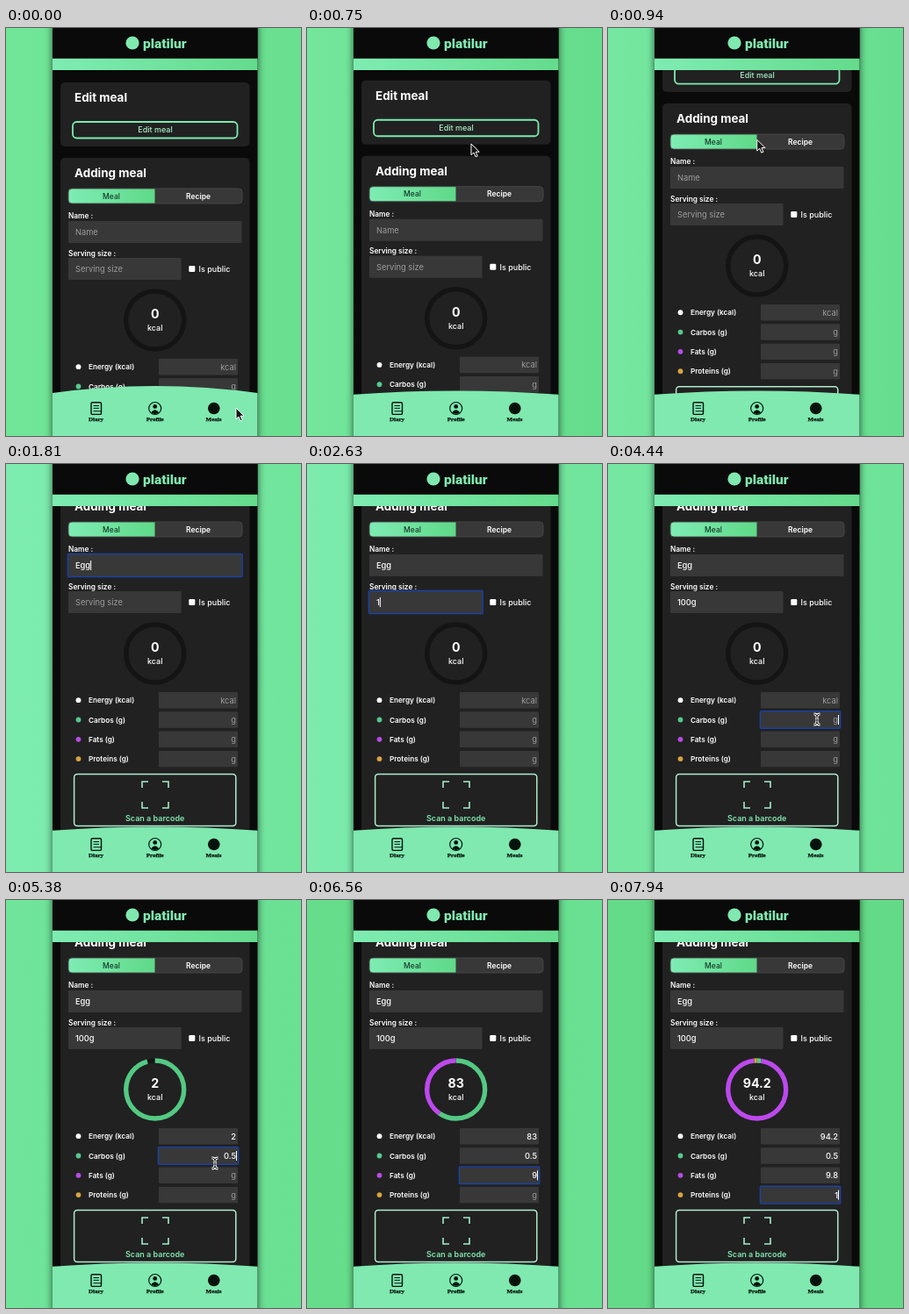
An HTML page that plays this animation: 336x465 px, repeating every 8 s.

```html
<!DOCTYPE html>
<html lang="en">
<head>
<meta charset="utf-8">
<title>Adding a meal</title>
<style>
  html, body { margin: 0; width: 100%; height: 100%; overflow: hidden; background: #6fe398; }
  svg { display: block; width: 100vw; height: 100vh; }
  text { font-family: Inter, "Open Sans", sans-serif; }
  .phone { filter: drop-shadow(0 0 4px rgba(0, 0, 0, .65)); }
  .nav text { font: bold 7px "Liberation Serif", serif; fill: #06130c; stroke: #06130c; stroke-width: .25; }
</style>
</head>
<body>
<svg id="stage" viewBox="0 0 336 465" preserveAspectRatio="none">
  <defs>
    <linearGradient id="backdrop"><stop/><stop offset="1"/></linearGradient>
    <linearGradient id="strip"><stop stop-color="#7eecb2"/><stop offset="1" stop-color="#64db8c"/></linearGradient>
    <linearGradient id="tab"><stop stop-color="#7eecb4"/><stop offset="1" stop-color="#5fd988"/></linearGradient>
  </defs>
</svg>
<script>
const LOOP = 8000;
const stage = document.getElementById('stage');
const MINT = '#7fe9b0', WHITE = '#fff', FIELD = '#383838', HINT = '#9b9b9b', INK = '#06130c';

function el(parent, name, attrs = {}) {
  const node = document.createElementNS('http://www.w3.org/2000/svg', name);
  set(node, attrs);
  parent.append(node);
  return node;
}
function set(node, attrs) {
  for (const key in attrs) node.setAttribute(key, attrs[key]);
}
const group = (parent, attrs) => el(parent, 'g', attrs);
const box = (parent, x, y, width, height, fill, more) =>
  el(parent, 'rect', { x, y, width, height, fill, ...more });
const path = (parent, d, more) => el(parent, 'path', { d, fill: 'none', ...more });
const dot = (parent, cx, cy, r, fill, more) => el(parent, 'circle', { cx, cy, r, fill, ...more });
const show = (node, visible) => set(node, { visibility: visible ? 'visible' : 'hidden' });
function label(parent, x, y, size, string, weight = 600, fill = WHITE, anchor = 'start') {
  const node = el(parent, 'text', {
    x, y, fill, 'font-size': size, 'font-weight': weight, 'text-anchor': anchor
  });
  node.textContent = string;
  return node;
}

// Piecewise tracks: rows of [time, value, ...]
const smooth = p => p * p * (3 - 2 * p);
function track(rows, t, ease = smooth) {
  let i = 0;
  while (i < rows.length - 2 && t >= rows[i + 1][0]) i++;
  const [a, b] = [rows[i], rows[i + 1]];
  const p = ease(Math.min(1, Math.max(0, (t - a[0]) / (b[0] - a[0]))));
  return a.slice(1).map((v, k) => v + (b[k + 1] - v) * p);
}

function addField(parent, x, y, width, height, hint, right, size) {
  box(parent, x, y, width, height, FIELD, { rx: 1 });
  const outline = box(parent, x - .6, y - .6, width + 1.2, height + 1.2, 'none',
    { rx: 1, stroke: '#1c429f', 'stroke-width': 1.5 });
  const tx = right ? x + width - 2 : x + 8;
  const text = label(parent, tx, y + height / 2 + 3.4, size, hint, 400, HINT, right ? 'end' : 'start');
  const caret = box(parent, 0, y + height / 2 - 5.5, 1, 11, WHITE);
  return (value, focused) => {
    text.textContent = value || hint;
    set(text, { fill: value ? WHITE : HINT, 'font-weight': value ? 500 : 400 });
    const end = right ? tx : tx + (value ? text.getComputedTextLength() : 0);
    set(caret, { x: end });
    show(caret, focused);
    show(outline, focused);
  };
}

// Scene
box(stage, 0, 0, 336, 465, 'url(#backdrop)');
box(stage, 53, -10, 233.5, 485, '#0a0a0a', { class: 'phone' });

const page = group(stage);
box(page, 62, 62, 215.5, 73, '#212121', { rx: 5 });
label(page, 78, 84, 13.4, 'Edit meal', 700);
box(page, 76, 107, 187.5, 18.5, 'none', { rx: 4.5, stroke: MINT, 'stroke-width': 1.8 });
label(page, 170, 119.3, 9, 'Edit meal', 500, '#a9efcb', 'middle');

box(page, 62, 148, 215.5, 420, '#212121', { rx: 5 });
label(page, 78, 170, 13.4, 'Adding meal', 700);
box(page, 71, 183, 198, 17, FIELD, { rx: 4 });
path(page, 'M169.5 183H75a4 4 0 0 0-4 4v9a4 4 0 0 0 4 4h94.5z', { fill: 'url(#tab)' });
box(page, 71, 183, 198, 17, 'none', { rx: 4, stroke: '#484848', 'stroke-width': .9 });
label(page, 120, 194.7, 8.5, 'Meal', 500, '#16392a', 'middle');
label(page, 219, 194.7, 8.5, 'Recipe', 600, WHITE, 'middle');

label(page, 71, 217, 8.3, 'Name :');
const nameField = addField(page, 71, 220, 197.5, 25, 'Name', false, 9.3);
label(page, 71, 259.5, 8.3, 'Serving size :');
const sizeField = addField(page, 71, 262, 128.5, 25, 'Serving size', false, 9.3);
box(page, 208.3, 271, 7, 7, WHITE, { rx: 1.2 });
label(page, 219.5, 277.8, 9, 'Is public', 500);

const ring = color => el(page, 'circle', {
  cx: 169.7, cy: 333, r: 33, fill: 'none', stroke: color, 'stroke-width': 5.4,
  pathLength: 100, transform: 'rotate(-90 169.7 333)'
});
ring('#141414');
const arcs = ['#54c983', '#bd49ed', '#d9a43f'].map(ring);
const total = label(page, 169.7, 331, 14.2, '0', 700, WHITE, 'middle');
label(page, 169.7, 345, 9, 'kcal', 500, WHITE, 'middle');

const rows = [
  ['Energy (kcal)', '#fff', 'kcal'], ['Carbos (g)', '#54c98c', 'g'],
  ['Fats (g)', '#b84be8', 'g'], ['Proteins (g)', '#d9a441', 'g']
].map(([name, color, hint], i) => {
  const y = 386.2 + i * 22.3;
  dot(page, 82.5, y, 2.9, color);
  label(page, 94, y + 3, 8.2, name);
  return addField(page, 174, y - 9.2, 90, 18.4, hint, true, 9.3);
});

box(page, 77.6, 470.6, 184.2, 59, 'none', { rx: 3.5, stroke: '#b0ebcf', 'stroke-width': 1.5 });
path(page, 'M155 486v-7h7M178 479h7v7M185 502v7h-7M162 509h-7v-7', { stroke: '#a6eccb', 'stroke-width': 1.6 });
label(page, 169.7, 524, 9, 'Scan a barcode', 600, MINT, 'middle');

box(stage, 53, 0, 233.5, 36, '#0a0a0a');
box(stage, 53, 34.8, 233.5, 13.2, 'url(#strip)');
dot(stage, 144, 17, 7.6, MINT);
set(label(stage, 156, 22.5, 15.5, 'platilur', 900, MINT), { style: 'font-family: Roboto, sans-serif' });

const nav = group(stage, { class: 'nav' });
const hump = path(nav, '', { fill: MINT });
const line = { stroke: INK, 'stroke-width': 1.4 };
box(nav, 97, 426.8, 11.5, 13.6, 'none', { rx: 1.5, ...line });
path(nav, 'M99.5 430.5h6.5M99.5 433.3h6.5M99.5 436.7h9', { ...line, 'stroke-width': 1 });
dot(nav, 169.7, 433.5, 7, 'none', { ...line, 'stroke-width': 1.2 });
dot(nav, 169.7, 431.4, 2.4, INK);
path(nav, 'M165.2 438.2q4.5-6 9 0q-4.5 3.4-9 0', { fill: INK });
dot(nav, 236.8, 433.5, 6.8, INK);
[[102.5, 'Diary'], [169.7, 'Profile'], [236.5, 'Meals']].forEach(([x, s]) =>
  label(nav, x, 448.3, 7, s, 700, INK, 'middle'));

const arrow = path(stage, 'M0 0V12.6L3 10 5 14.8 7.2 13.9 5.2 9.2H9.2Z',
  { fill: '#161616', stroke: WHITE, 'stroke-width': 1, 'stroke-linejoin': 'round' });
const beam = group(stage);
for (const [stroke, width] of [[WHITE, 3], ['#222', 1]])
  path(beam, 'M-3.5-6Q0-6 0-3.5Q0-6 3.5-6M0-4V4M-3.5 6Q0 6 0 3.5Q0 6 3.5 6M-2 1H2',
    { stroke, 'stroke-width': width });

// Timeline
const scroll = [[0, 0], [715, 0], [1150, -117]];
const backdrop = [
  [0, 113, 229, 152, 105, 223, 143], [750, 115, 230, 156, 101, 221, 140],
  [1810, 126, 236, 176, 112, 228, 155], [3500, 122, 234, 170, 113, 228, 158],
  [5380, 112, 228, 154, 106, 224, 147], [6560, 102, 221, 139, 106, 224, 146],
  [8000, 100, 219, 136, 99, 218, 135]
];
const pointer = [
  [0, 262, 433], [120, 262, 433], [750, 187, 132], [1150, 150, 122], [1300, 130, 117],
  [1950, 130, 117], [2300, 150, 158], [3250, 150, 158], [3500, 223, 246], [3950, 238, 291],
  [5200, 238, 291], [5380, 238, 300], [5750, 238, 314], [7050, 238, 314], [7350, 238, 336]
];
const hidden = [[1480, 1950], [2560, 3250], [4560, 5200], [6380, 7050], [7800, LOOP]];
const focus = [[1320, 'name'], [2330, 'size'], [4150, 1], [5850, 2], [7450, 3]];
const typing = {
  name: ['Egg', 1500, 1630, 1750],
  size: ['100g', 2600, 2750, 2880, 3120],
  1: ['0.5', 4600, 4720, 4835],
  2: ['9.8', 6436, 6720, 6900],
  3: ['1', 7835]
};
const typed = (key, t) => {
  const [string, ...times] = typing[key];
  return string.slice(0, times.filter(time => t >= time).length);
};

const KCAL = [4, 9, 4];
const energyParts = t => KCAL.map((k, i) => k * (parseFloat(typed(i + 1, t)) || 0));
const sum = list => list.reduce((a, b) => a + b, 0);
const shares = t => {
  const parts = energyParts(t), all = sum(parts);
  return parts.map(v => all ? 100 * v / all : 0);
};
const updates = [typing[1][3], typing[2][1], typing[2][3], typing[3][1]];
function ringShares(t) {
  let from = [0, 0, 0];
  updates.forEach((start, i) => {
    if (t < start) return;
    const until = Math.min(t, updates[i + 1] ?? LOOP);
    const p = 1 - (1 - Math.min(1, (until - start) / 1000)) ** 4;
    from = shares(start).map((v, k) => from[k] + (v - from[k]) * p);
  });
  return from;
}

function render(t) {
  const c = track(backdrop, t, p => p).map(Math.round);
  const stops = document.querySelectorAll('#backdrop stop');
  set(stops[0], { 'stop-color': `rgb(${c.slice(0, 3)})` });
  set(stops[1], { 'stop-color': `rgb(${c.slice(3)})` });

  const [offset] = track(scroll, t);
  set(page, { transform: `translate(0 ${offset})` });

  const [crest] = track([[0, 408], [400, 413.6]], t);
  const edge = 416 + (crest - 408) / 3;
  set(hump, { d: `M53 465V${edge}Q169.7 ${2 * crest - edge} 286.5 ${edge}V465Z` });

  const active = focus.filter(([time]) => t >= time).pop()?.[1];
  nameField(typed('name', t), active === 'name');
  sizeField(typed('size', t), active === 'size');
  const energy = String(+sum(energyParts(t)).toFixed(1));
  total.textContent = energy;
  rows[0](energy === '0' ? '' : energy, false);
  for (const i of [1, 2, 3]) rows[i](typed(i, t), active === i);

  let start = 0;
  ringShares(t).forEach((share, i) => {
    set(arcs[i], { 'stroke-dasharray': `${share} 200`, 'stroke-dashoffset': -start });
    show(arcs[i], share > .01);
    start += share;
  });

  const [x, y] = track(pointer, t);
  const away = hidden.some(([a, b]) => t >= a && t < b);
  const overText = (t > 1200 && t < 3300) || t > 3850;
  for (const node of [arrow, beam]) set(node, { transform: `translate(${x} ${y})` });
  show(arrow, !away && !overText);
  show(beam, !away && overText);
}

const began = performance.now();
function tick() {
  render((performance.now() - began) % LOOP);
  requestAnimationFrame(tick);
}
tick();
</script>
</body>
</html>
```
